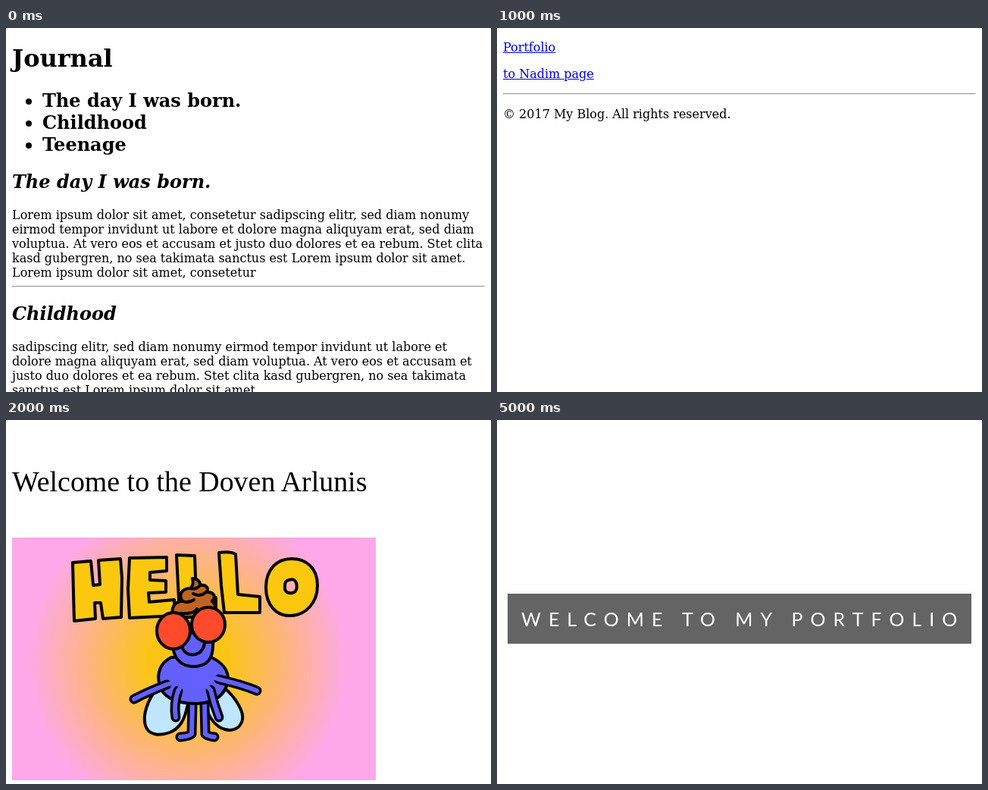
Write an HTML page that moves like this. It is 640 px wide and 480 px high and loops after 5500 ms.

```html
<!DOCTYPE html>
<html lang="en">
<head>
<meta charset="utf-8">
<title>Pages</title>
<style>
html, body { margin: 0; width: 100%; height: 100%; overflow: hidden; background: #fff; }
body { position: relative; font: 16px "DejaVu Serif", serif; color: #000; }
section { position: absolute; inset: 0; overflow: hidden; padding: 0 8px; white-space: nowrap; display: none; }
section:first-child { display: block; }
h1 { font-size: 32px; margin: 21.44px 0; }
h2 { font-size: 24px; margin: 19.92px 0; }
ul { margin: 16px 0; padding-left: 40px; }
#journal ul { font-size: 24px; font-weight: bold; margin: 21.44px 0 19.92px; }
#journal h2 { font-style: italic; }
#menu { background: #d8d8d8; }
#menu a { color: #000; }
a { color: #00e; text-decoration: underline; }
.book { position: absolute; left: 0; top: 0; font-family: "Liberation Serif", serif; }
#hello h1, #hello h2 { position: absolute; left: 8px; margin: 0; }
#hello h1 { top: 48px; }
#hello h2 { top: 470px; }
#banner div { position: absolute; left: 14px; top: 229px; width: 594px; height: 30px; padding: 18px 0 18px 18px;
  background: #646464; color: #fff; font: 25px/30px Lato, sans-serif; letter-spacing: 10px; }
#fly { position: absolute; left: 8px; display: none; }
</style>
</head>
<body>
<section id="journal">
  <h1>Journal</h1>
  <ul><li>The day I was born.</li><li>Childhood</li><li>Teenage</li></ul>
  <h2>The day I was born.</h2>
  Lorem ipsum dolor sit amet, consetetur sadipscing elitr, sed diam nonumy<br>
  eirmod tempor invidunt ut labore et dolore magna aliquyam erat, sed diam<br>
  voluptua. At vero eos et accusam et justo duo dolores et ea rebum. Stet clita<br>
  kasd gubergren, no sea takimata sanctus est Lorem ipsum dolor sit amet.<br>
  Lorem ipsum dolor sit amet, consetetur
  <hr>
  <h2>Childhood</h2>
  sadipscing elitr, sed diam nonumy eirmod tempor invidunt ut labore et<br>
  dolore magna aliquyam erat, sed diam voluptua. At vero eos et accusam et<br>
  justo duo dolores et ea rebum. Stet clita kasd gubergren, no sea takimata<br>
  sanctus est Lorem ipsum dolor sit amet.
</section>

<section id="menu">
  <ul><li><a>About me</a></li><li><a>Journal</a></li></ul>
</section>

<section id="links">
  <p><a>Portfolio</a></p>
  <p><a>to Nadim page</a></p>
  <hr>
  <p>© 2017 My Blog. All rights reserved.</p>
</section>

<section id="intro">
  <svg class="book" width="640" height="480">
    <text x="8" y="113" font-size="46.4">Welcome to the Doven Arlunis</text>
    <text x="8" y="248" font-size="35.6">Introduction</text>
    <text x="8" y="313" font-size="27.3">Lorem ipsum dolor sit amet, consectetur</text>
    <g font-size="23.1">
      <text x="8" y="369">adipiscing elit, sed do eiusmod tempor incididunt ut labore et</text>
      <text x="8" y="399">dolore magna aliqua. Faucibus nisl tincidunt eget nullam non nisi</text>
      <text x="8" y="429">est. Purus non enim praesent elementum facilisis. Condimentum id</text>
      <text x="8" y="459">venenatis a condimentum vitae sapien pellentesque habitant morbi.</text>
      <text x="8" y="489">In eu mi bibendum neque. Odio tempor orci dapibus ultrices</text>
    </g>
  </svg>
</section>

<section id="welcome">
  <svg class="book" width="640" height="480">
    <text x="8" y="94" font-size="37.9">Welcome to the Doven Arlunis</text>
  </svg>
</section>

<section id="hello">
  <h1>Welcome to the <em>Doven Arlunis</em></h1>
  <h2>Introduction</h2>
</section>

<section id="banner"><div>WELCOME TO MY PORTFOLIO</div></section>

<svg id="fly" width="480" height="320" viewBox="8 127 480 320">
  <defs>
    <radialGradient id="glow" gradientUnits="userSpaceOnUse" cx="240" cy="290" r="212">
      <stop offset=".25" stop-color="#fcc516"/>
      <stop offset=".62" stop-color="#fdb580"/>
      <stop offset="1" stop-color="#fea8ea"/>
    </radialGradient>
  </defs>
  <path fill="url(#glow)" d="M8 127h480v320H8z"/>
  <g stroke="#000" stroke-width="4" stroke-linejoin="round" stroke-linecap="round">
    <g fill="#fcc80f">
      <path d="M88 160L112 158 115 190 124 189 122 157 151 155 153 180 152 232 128 234 125 213 117 213 118 234 90 237 89 200z"/>
      <path d="M163 154L212 153 212 171 190 173 190 183 211 184 211 199 188 200 189 212 222 209 222 230 163 233 161 195z"/>
      <path d="M225 150L249 151 251 205 277 206 277 227 229 229z"/>
      <path d="M281 147Q296 145 303 149L306 202 335 205 335 226 288 226 284 190z"/>
      <path fill-rule="evenodd" d="M343 193C343 168 358 155 377 155S411 167 411 190 396 229 376 230 343 215 343 193zM368 192C367 199 373 201 378 200S385 193 383 187 377 182 373 183 368 186 368 192z"/>
    </g>
    <g fill="#bfe5ff">
      <path d="M200 325C186 342 180 362 184 375S203 389 216 384 236 368 240 346z"/>
      <path d="M288 325C303 338 314 356 312 367S300 383 289 380 268 366 262 346z"/>
    </g>
    <path fill="#c0651d" d="M220 232C217 219 223 211 233 211 227 203 232 194 243 194 248 190 247 185 246 181 252 181 257 185 256 190 266 188 268 196 264 199 274 198 278 205 272 211 279 216 276 225 275 232z"/>
    <path fill="none" d="M233 211Q241 214 248 209M243 194Q251 196 256 190M231 227Q249 228 252 221M264 199Q256 206 247 201"/>
    <g id="legs"></g>
    <path fill="#6460ff" d="M218 285C204 292 199 305 202 319 205 337 224 346 249 346S289 336 293 316C294 303 286 292 271 285z"/>
    <g id="arms"></g>
    <path fill="#6460ff" d="M224 254C215 277 225 297 248 297S276 280 272 250z"/>
    <path fill="none" d="M232 266C231 287 262 287 262 264"/>
    <g fill="#ff4b2b">
      <ellipse cx="221" cy="250" rx="22" ry="24"/>
      <ellipse cx="267" cy="242" rx="22" ry="23"/>
    </g>
  </g>
</svg>

<script>
const $ = id => document.getElementById(id);

// A limb is a black line under a thinner one whose start reaches into the body.
const limb = (root, path) =>
  `<path d="M${path}" fill="none" stroke="#000" stroke-width="13"/>` +
  `<path d="M${root}L${path}" fill="none" stroke="#6460ff" stroke-width="6"/>`;

$('legs').innerHTML =
  limb('246 335', '246 345L245 386Q242 389 230 390') +
  limb('262 335', '262 345L263 386Q266 389 275 390');
$('arms').innerHTML =
  limb('232 322', '227 329Q221 347 224 364') +
  limb('264 322', '270 328Q274 346 281 364') +
  limb('224 317', '212 321Q188 330 169 340') +
  limb('270 310', '281 314Q312 321 331 329');

const pages = document.querySelectorAll('section');
const fly = $('fly');

function draw() {
  const t = performance.now() % 5500;
  const now = t >= 5000 ? 6 : Math.min(5, Math.floor(t / 500));
  pages.forEach((page, i) => page.style.display = i === now ? 'block' : 'none');
  fly.style.display = now === 4 || now === 5 ? 'block' : 'none';
  fly.style.top = now === 4 ? '155px' : '127px';
  requestAnimationFrame(draw);
}
draw();
</script>
</body>
</html>
```
